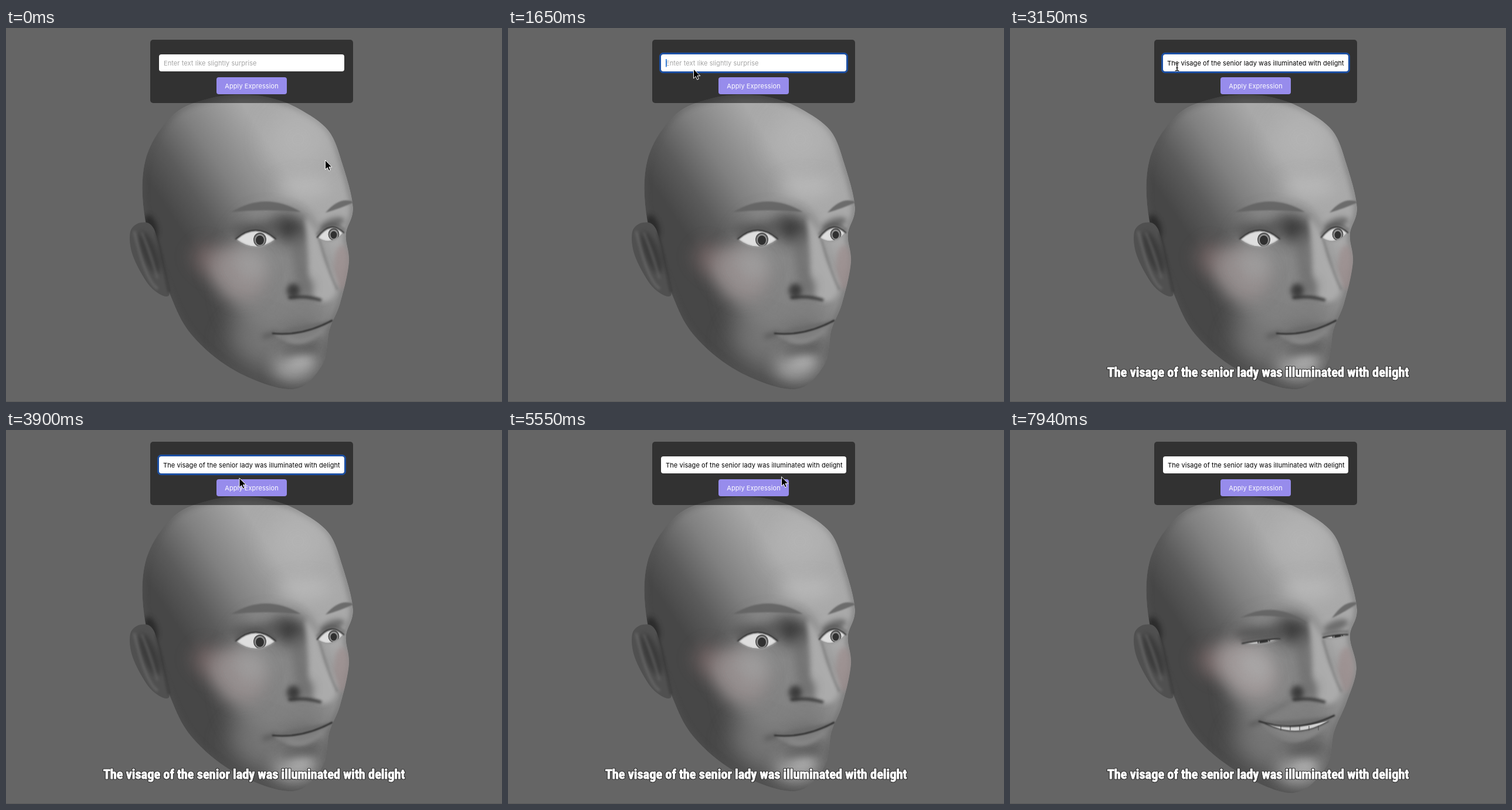
Animation, 846 px wide and 638 px high, one loop 8 s. Source, as an HTML page:

```html
<!DOCTYPE html>
<html lang="en">
<head>
<meta charset="utf-8">
<title>Expression demo</title>
<style>
html, body { margin: 0; width: 100%; height: 100%; overflow: hidden; background: #656565; }
svg { position: absolute; left: 0; top: 0; width: 846px; height: 638px; display: block; }
#headView { will-change: transform; }
.ui { font: 400 11px Inter, "Open Sans", sans-serif; letter-spacing: .08px; }
#caption { font-family: Impact, "Roboto Condensed", Roboto, "Open Sans", sans-serif; font-weight: 800; font-stretch: 75%; }
</style>
</head>
<body>
<svg id="headView" viewBox="0 0 846 638">
  <defs id="defs">
    <linearGradient id="skin" gradientUnits="userSpaceOnUse" x1="250" y1="270" x2="422" y2="157">
      <stop offset="0" stop-color="#474747"/>
      <stop offset=".25" stop-color="#5b5b5b"/>
      <stop offset=".55" stop-color="#808080"/>
      <stop offset="1" stop-color="#a9a9a9"/>
    </linearGradient>
  </defs>
</svg>
<svg viewBox="0 0 846 638">
  <defs>
    <text id="caption" x="423" y="595" text-anchor="middle" fill="#fff" stroke-linejoin="round"></text>
    <path id="beamShape" d="M-3.5-7Q0-7 0-5Q0-7 3.5-7M0-5V5M-3.5 7Q0 7 0 5Q0 7 3.5 7M-2 2H2"/>
  </defs>
  <rect y="637" width="846" height="1" fill="#595959"/>
  <rect x="246" y="20" width="346" height="108" rx="5" fill-opacity=".5"/>
  <rect id="ring" x="259.5" y="43.5" width="319" height="32" rx="5" fill="none" stroke="#1c4fa3" stroke-width="3"/>
  <rect x="261" y="45" width="316" height="29" rx="4" fill="#fff"/>
  <text id="field" class="ui" y="64"></text>
  <rect id="caret" y="53" width="1.6" height="13.5" fill="#1a70dc"/>
  <rect id="button" x="359" y="84" width="120" height="29" rx="4"/>
  <text class="ui" x="419" y="103" text-anchor="middle" fill="#fff">Apply Expression</text>
  <g id="subtitle">
    <use href="#caption" stroke="#333" stroke-width="3.2"/>
    <use href="#caption" stroke="#fff" stroke-width=".8"/>
  </g>
  <path id="arrow" d="M0 0V16L3.7 12.6 6.2 18.2 8.8 17 6.4 11.6H11.4Z" stroke="#fff"/>
  <g id="beam" fill="none">
    <use href="#beamShape" stroke="#fff" stroke-width="2.6"/>
    <use href="#beamShape" stroke="#000" stroke-width="1.2"/>
  </g>
  <g id="hand" stroke="#000">
    <path d="M-1.5 8V1a1.5 1.5 0 0 1 3 0V5.2a1.4 1.4 0 0 1 2.6 0a1.4 1.4 0 0 1 2.4 .4a1.4 1.4 0 0 1 2.3 .7V10.5q0 2-1 3.4V15.5H.8V14L-3 9.4a1.3 1.3 0 0 1 1.5-2Z" fill="#fff"/>
    <path d="M2 10V13.4M4 10V13.4M6 10V13.4" stroke-width=".8"/>
  </g>
</svg>
<script>
const $ = id => document.getElementById(id);

function add(parent, tag, attrs) {
  const el = document.createElementNS('http://www.w3.org/2000/svg', tag);
  for (const k in attrs) el.setAttribute(k, attrs[k]);
  return parent.appendChild(el);
}

// Smooth closed curve through "x,y x,y ..." points.
function loop(text) {
  const p = text.split(' ').map(s => s.split(',').map(Number));
  const at = i => p[(i + p.length) % p.length];
  const lean = (i, sign) => [0, 1].map(k => at(i)[k] + sign * (at(i + 1)[k] - at(i - 1)[k]) / 6);
  return 'M' + p[0] + p.map((_, i) => `C${lean(i, 1)} ${lean(i + 1, -1)} ${at(i + 1)}`).join('') + 'Z';
}

// An arc sagging by `sag` below its chord, and the shape between two such arcs.
const arc = (x1, y1, x2, y2, sag) => `M${x1} ${y1}Q${(x1 + x2) / 2} ${(y1 + y2) / 2 + 2 * sag} ${x2} ${y2}`;
const leaf = (x1, y1, x2, y2, up, down) =>
  arc(x1, y1, x2, y2, -up) + arc(x2, y2, x1, y1, down).replace(/^M[^Q]*/, '') + 'Z';

for (const r of [1, 2, 4, 8, 14, 20]) {
  const f = add($('defs'), 'filter', { id: 'b' + r, filterUnits: 'userSpaceOnUse', x: 0, y: 0,
    width: 846, height: 638, 'color-interpolation-filters': 'sRGB' });
  add(f, 'feGaussianBlur', { stdDeviation: r });
}
const soft = r => r ? { filter: `url(#b${r})` } : {};
const grey = v => `rgb(${v},${v},${v})`;
const tint = v => typeof v === 'number' ? grey(v) : v;

const blob = (g, cx, cy, rx, ry, tone, blur, opacity = 1, turn = 0) =>
  add(g, 'ellipse', { cx, cy, rx, ry, fill: tint(tone), opacity, transform: `rotate(${turn} ${cx} ${cy})`, ...soft(blur) });
const area = (g, d, tone, blur, opacity = 1) => add(g, 'path', { d, fill: tint(tone), opacity, ...soft(blur) });
const line = (g, d, tone, width, blur, opacity = 1) =>
  add(g, 'path', { d, fill: 'none', stroke: tint(tone), 'stroke-width': width, 'stroke-linecap': 'round', opacity, ...soft(blur) });

function clipped(parent, id, d) {
  add(add($('defs'), 'clipPath', { id }), 'path', { d });
  return add(parent, 'g', { 'clip-path': `url(#${id})` });
}

// Head with a smile from 0 (calm) to 1 (delighted).
function buildHead(smile) {
  const mix = (a, b) => a + (b - a) * smile;
  const root = add($('headView'), 'g', {});
  const outline = loop('278,450 238,330 238,225 285,148 350,119 412,114 455,120 500,138 550,175 574,232 592,306 580,352 ' +
    `${mix(585, 591)},${mix(400, 408)} ${mix(570, 574)},${mix(470, 465)} ${mix(552, 553)},515 540,574 ` +
    `${mix(490, 484)},${mix(616, 619)} 395,587 318,525`);
  const g = clipped(root, 'skull' + smile, outline);
  area(g, outline, 'url(#skin)');
  line(g, outline, 85, 10, 4, .4);

  forehead();
  cheeks();
  nose();
  brows();
  eye(mix(392, 396), mix(360, 364), mix(460, 461), mix(360, 356), mix(15, 1), mix(13, 4), 433, 361, 11);
  eye(mix(531, 534), mix(357, 354), 576, 349, mix(13, 1.5), mix(10, 3), 559, 352, 9.5);
  mouth();
  ear();
  return root;

  function forehead() {
    blob(g, 498, 190, 52, 50, 180, 20, .9);
    blob(g, 510, 270, 46, 18, 188, 14, .8);
    blob(g, 247, 338, 10, 20, 36, 4, .8, -20);
  }

  function cheeks() {
    blob(g, 448, 430, 68, 108, 137, 20, .85);
    blob(g, 442, 547, 68, 38, 122, 20, .85, 28);
    blob(g, 345, 395, 30, 24, '#7d6b6b', 14, .7, 45);
    blob(g, mix(394, 402), mix(418, 408), mix(52, 60), 42, mix(0, 1) ? '#a39b9b' : '#989090', 14, .9, 40);
    blob(g, 418, 402, 30, 26, mix(162, 172), 14, .7, 30);
    blob(g, 573, 408, 14, 38, '#9a8b8b', 4, .7);
    blob(g, 494, mix(577, 582), 38, 24, 166, 14, .95, -10);
    blob(g, 504, mix(566, 574), 18, 10, 178, 8, .7);
  }

  function nose() {
    blob(g, 484, 341, 32, 23, 46, 14, .9, 15);
    blob(g, 502, 392, 13, 48, 98, 8, .55, -6);
    area(g, loop('512,325 531,352 541,388 563,434 556,462 530,464 518,430 516,380'), 174, 4, .9);
    blob(g, 510, 441, 15, 16, 112, 8, .9);
    blob(g, 490, 448, 11, 12, 44, 4, .8);
    line(g, arc(484, 460, 536, 464, -3), 44, 5, 2, .8);
    line(g, arc(534, 358, 565, 446, 6), 92, 2.5, 2, .7);
    blob(g, 500, 484, 26, 12, 128, 8, .6);
  }

  function brows() {
    blob(g, 425, mix(341, 346), 44, 10, mix(76, 68), 8, .75, -4);
    blob(g, 556, 334, 22, 9, 70, 4, .6, -20);
    area(g, leaf(mix(384, 393), mix(314, 320), mix(503, 508), mix(314, 330), 18, mix(-3, -7)), 99, 1, .9);
    area(g, leaf(mix(545, 549), mix(315, 321), 594, mix(297, 295), 10, 1), 101, 1, .9);
  }

  function eye(x1, y1, x2, y2, up, down, ix, iy, r) {
    const shape = leaf(x1, y1, x2, y2, up, down);
    const ball = clipped(g, `eye${smile}-${ix}`, shape);
    area(ball, shape, 222);
    [85, 145, 48].forEach((tone, i) => blob(ball, ix, iy + i / 2, r - 2 * i, r + 1 - 2 * i, tone));
    line(g, arc(x1, y1, x2, y2, down + 1), 155, 2.5, 1, .8);
    line(g, arc(x1, y1, x2, y2, -up), 42, 2.4, 1);
    line(g, arc(x1, y1 - 5, x2, y2 - 5, -up), 80, 4, 2, .6);
  }

  function mouth() {
    const ends = [mix(455, 425), mix(521, 497), mix(556, 553), mix(499, 487)];
    const sag = mix(8, 13);
    line(g, arc(ends[0] - 14, ends[1] + 5, ends[0] + 4, ends[1], 0), 78, 7, 4, .7);
    blob(g, 503, mix(549, 545), 34, 6, 82, 8, .9, -8);
    area(g, leaf(...ends, mix(2, -3), sag), 107, 2, .9);
    area(g, leaf(...ends, -sag, mix(28, 41)), 126, 2);
    line(g, arc(ends[0] + 25, ends[1] + 8, ends[2] - 15, ends[3] + 17, mix(11, 17)), 146, 5, 4, .8);
    if (smile) {
      area(g, leaf(436, 500, 543, 496, -7, 15), 213);
      for (let x = 462; x < 530; x += 16) line(g, arc(x, 505, x, 512, 0), 85, 1.2);
      line(g, arc(436, 501, 543, 497, 15), 68, 1.6, 1, .9);
      line(g, arc(478, 463, 428, 490, 0), 91, 6, 4, .4);
    }
    line(g, arc(...ends, sag), 42, 2.6, 1);
  }

  function ear() {
    area(root, loop('252,342 230,332 212,348 217,390 247,442 278,456 268,405'), 80);
    blob(root, 245, 383, 13, 38, 54, 4, .8, -22);
    line(root, arc(219, 348, 258, 444, 18), 112, 4, 2, .7);
    line(root, arc(232, 350, 258, 426, -4), 104, 4, 2, .7);
    line(root, arc(256, 350, 278, 450, 0), 50, 3, 2, .8);
  }
}

const heads = [buildHead(0), buildHead(1)];

const HINT = 'Enter text like slightly surprise';
const LINE = 'The visage of the senior lady was illuminated with delight';
const caption = $('caption');
caption.textContent = LINE;
caption.style.fontSize = '100px';
caption.style.fontSize = Math.min(24, 51500 / caption.getComputedTextLength()) + 'px';

// Pointer strokes: start time, steps of 150 ms, and a quadratic path.
const STROKES = [
  { at: 600, n: 5, path: [[544.5, 225.5], [380, -65], [316.5, 70]] },
  { at: 2100, n: 5, path: [[322, 69], [300, 66], [285, 66]] },
  { at: 3600, n: 6, path: [[285, 66], [451, 82.5], [405, 96.5]] },
  { at: 5550, n: 5, path: [[405, 96.5], [560, 41], [702.5, 120.5]] }
];

function pointer(t) {
  const s = STROKES.filter(k => t >= k.at).pop();
  if (!s) return STROKES[0].path[0];
  const u = Math.min(s.n, Math.floor((t - s.at + 10) / 150) + 1) / s.n;
  const [a, b, c] = s.path;
  return [0, 1].map(k => (1 - u) ** 2 * a[k] + 2 * u * (1 - u) * b[k] + u * u * c[k]);
}

function set(id, attrs) {
  for (const k in attrs) {
    const v = String(attrs[k]);
    if ($(id).getAttribute(k) !== v) $(id).setAttribute(k, v);
  }
}
function show(el, on) {
  const v = on ? '' : 'none';
  if (el.style.display !== v) el.style.display = v;
}

function render(t) {
  const [x, y] = pointer(t);
  const typed = t >= 3150;
  const focus = t >= 1650 && t < 5100;
  const hover = x > 359 && x < 479 && y > 84 && y < 113;
  const inField = t >= 2100 && x > 261 && x < 577 && y > 45 && y < 73.5;
  const kind = t >= 6440 ? '' : hover ? 'hand' : inField ? 'beam' : 'arrow';
  for (const id of ['arrow', 'beam', 'hand']) {
    show($(id), id === kind);
    set(id, { transform: `translate(${x.toFixed(1)} ${y.toFixed(1)})` });
  }

  const text = typed ? LINE : HINT;
  if ($('field').textContent !== text) $('field').textContent = text;
  set('field', { x: typed && focus ? 268 : 269, fill: typed ? '#000' : '#a4a4a4' });
  show($('ring'), focus);
  show($('caret'), focus && (!typed || t >= 4200));
  set('caret', { x: typed ? 567.4 : 269, opacity: t >= 4950 ? .3 : 1 });
  set('button', { fill: hover ? '#7063e8' : '#978cec' });
  show($('subtitle'), typed);
  heads.forEach((head, i) => show(head, i === Number(t >= 7940)));
}

const start = performance.now();
function tick() {
  render((performance.now() - start) % 8000);
  requestAnimationFrame(tick);
}
tick();
</script>
</body>
</html>
```
